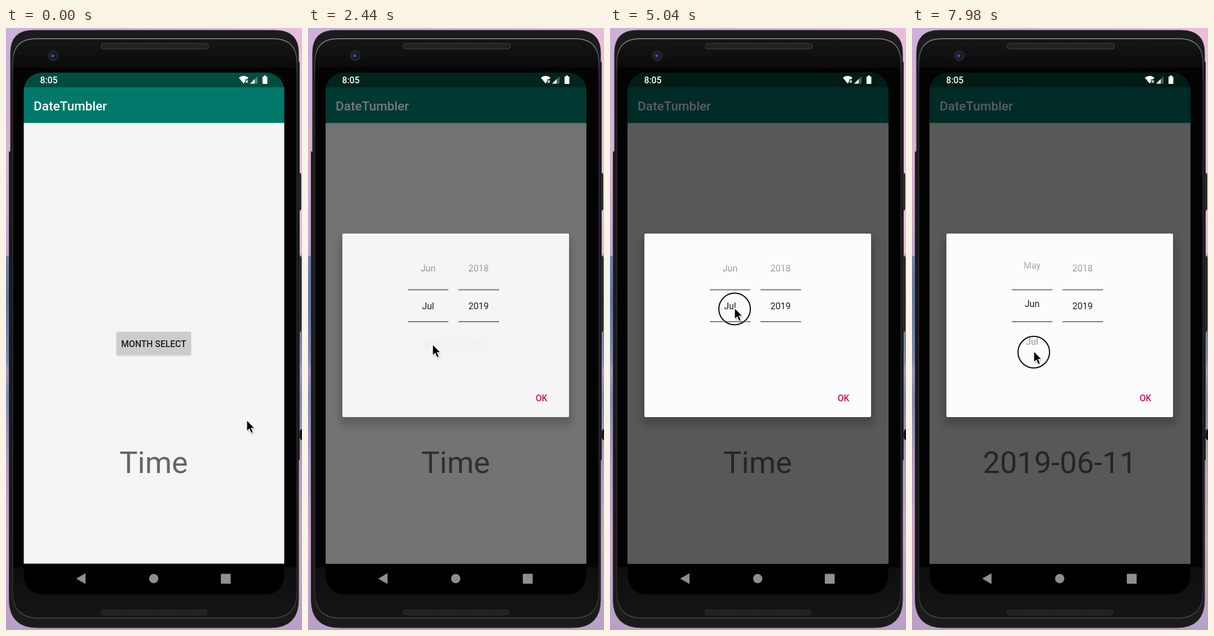
Animation of 525x1066 px, one loop 8000 ms. Source, as an HTML page:

```html
<!DOCTYPE html>
<html lang="en">
<head>
<meta charset="utf-8">
<title>Month dialog</title>
<style>
  html, body { margin: 0; width: 100%; height: 100%; overflow: hidden; background: #c9a4c9; }
  svg { display: block; width: 100%; height: 100%; }
  text { font-family: Roboto, sans-serif; }
  .medium { font-weight: 500; }
  .center { text-anchor: middle; }
  .wheel { font-size: 16px; fill: #1c1c1c; text-anchor: middle; }
</style>
</head>
<body>
<svg viewBox="0 0 525 1066" preserveAspectRatio="none">
  <defs>
    <linearGradient id="sky" x2="0" y2="1">
      <stop offset="0" stop-color="#cbb0d8"/>
      <stop offset=".2" stop-color="#d8b2d2"/>
      <stop offset=".378" stop-color="#c3a4cb"/>
      <stop offset=".38" stop-color="#7381ae"/>
      <stop offset=".45" stop-color="#6478a5"/>
      <stop offset=".55" stop-color="#8288b2"/>
      <stop offset=".57" stop-color="#a797be"/>
      <stop offset=".61" stop-color="#8389b2"/>
      <stop offset=".72" stop-color="#b49bc2"/>
      <stop offset=".85" stop-color="#cba6c9"/>
      <stop offset="1" stop-color="#b9a0c6"/>
    </linearGradient>
    <linearGradient id="glow">
      <stop offset=".3" stop-color="#f3c2dc" stop-opacity="0"/>
      <stop offset="1" stop-color="#f3c2dc" stop-opacity=".75"/>
    </linearGradient>
    <linearGradient id="body" x2="0" y2="1">
      <stop offset="0" stop-color="#161616"/>
      <stop offset=".05" stop-color="#0b0b0b"/>
      <stop offset=".9" stop-color="#0d0d0d"/>
      <stop offset="1" stop-color="#151515"/>
    </linearGradient>
    <linearGradient id="glint" x2="0" y2="1">
      <stop offset="0" stop-color="#8a8a8a"/>
      <stop offset=".03" stop-color="#505050"/>
      <stop offset=".07" stop-color="#2b2b2b"/>
      <stop offset=".95" stop-color="#2b2b2b"/>
      <stop offset="1" stop-color="#484848"/>
    </linearGradient>
    <linearGradient id="barShade" x2="0" y2="1">
      <stop offset="0" stop-opacity=".12"/>
      <stop offset="1" stop-opacity="0"/>
    </linearGradient>
    <linearGradient id="fade" gradientUnits="userSpaceOnUse" x1="0" x2="0" y1="391" y2="594">
      <stop offset="0" stop-color="#fff" stop-opacity="0"/>
      <stop offset=".4" stop-color="#fff"/>
      <stop offset=".6" stop-color="#fff"/>
      <stop offset="1" stop-color="#fff" stop-opacity="0"/>
    </linearGradient>
    <mask id="wheelMask" maskUnits="userSpaceOnUse" x="170" y="391" width="180" height="203">
      <rect x="170" y="391" width="180" height="203" fill="url(#fade)"/>
    </mask>
    <pattern id="mesh" width="3" height="3" patternUnits="userSpaceOnUse">
      <rect width="3" height="3" fill="#1b1b1b"/>
      <path d="M0 0h1.5v1.5H0z" fill="#343434"/>
    </pattern>
    <filter id="soft" x="-20%" y="-20%" width="140%" height="140%"><feGaussianBlur stdDeviation="7"/></filter>
    <filter id="small" x="-20%" y="-40%" width="140%" height="180%"><feGaussianBlur stdDeviation="1.5"/></filter>
    <clipPath id="screen"><path d="M31.500 948.500V111A32 32 0 0 1 63.500 79H461.500A32 32 0 0 1 493.500 111V948.500Z"/></clipPath>
    <clipPath id="btn"><rect x="196" y="538" width="132" height="41" rx="2"/></clipPath>
  </defs>

  <rect width="525" height="1066" fill="url(#sky)"/>
  <rect width="525" height="400" fill="url(#glow)"/>
  <ellipse cx="525" cy="720" rx="5" ry="10" fill="#16131a"/>
  <path d="M518 257h3q2 0 2 3v60q0 3-2 3h-3zM518 404h3q2 0 2 3v128q0 3-2 3h-3z" fill="#242426" stroke="#090909"/>
  <path d="M8 44Q8 4 48 4H477Q519 4 519 44V60H520.500V765H519V1012Q519 1062 469 1062H56Q5.500 1062 5.500 1012V219H8Z" fill="#1b1b1b" stroke="#333335"/>
  <path d="M12 60Q13 19 52 19H474Q515 19 516 60V1000Q516 1045 470 1045H58Q12 1045 12 1000Z" fill="url(#body)" stroke="url(#glint)" stroke-width="1.600"/>
  <rect x="13" y="70" width="502" height="885" fill="#030303"/>
  <rect x="169" y="27.500" width="190" height="9.500" rx="4" fill="url(#mesh)" stroke="#444"/>
  <rect x="168.500" y="1030.500" width="188" height="8.500" rx="4" fill="url(#mesh)" stroke="#303030"/>
  <circle cx="84" cy="49" r="9.500" fill="#262628"/>
  <circle cx="84" cy="49" r="6" fill="#0f1428"/>
  <circle cx="83" cy="49" r="3" fill="#35508a"/>
  <path d="M31.500 948H493.500V971A32 32 0 0 1 461.500 1003H63.500A32 32 0 0 1 31.500 971Z"/>
  <g fill="#8f8f8f">
    <path d="M124.500 975L141 965.500V984.500Z"/>
    <circle cx="262" cy="975" r="8.200"/>
    <rect x="381" y="966.500" width="17.500" height="17.500" rx="1"/>
  </g>

  <g clip-path="url(#screen)">
    <rect x="31" y="168" width="463" height="781" fill="#f5f5f5"/>
    <rect x="31" y="168" width="463" height="3" fill="url(#barShade)"/>
    <rect x="31" y="105" width="463" height="63" fill="#00796b"/>
    <rect x="31" y="79" width="463" height="26" fill="#004d40"/>
    <text class="medium" x="49" y="145.500" font-size="22.500" fill="#fff">DateTumbler</text>
    <rect id="lift" x="195" y="540" width="135" height="44" rx="3" filter="url(#small)"/>
    <rect x="196" y="539" width="132" height="41" rx="2" opacity=".2" filter="url(#small)"/>
    <rect x="196" y="538" width="132" height="41" rx="2" fill="#ccc"/>
    <g id="press" clip-path="url(#btn)">
      <rect x="196" y="538" width="132" height="41" opacity=".04"/>
      <circle id="ripple" cx="221" cy="561" opacity=".1"/>
    </g>
    <text class="medium center" x="262" y="564.500" font-size="15.700" fill="#1f1f1f">MONTH SELECT</text>
    <text id="result" class="center" x="262" y="787.800" font-size="54" fill="#666">Time</text>
    <rect id="dim" x="31" y="79" width="463" height="870"/>

    <g id="dialog">
      <rect x="56" y="372" width="412" height="331" rx="6" opacity=".19" filter="url(#soft)"/>
      <rect x="61" y="364" width="402" height="325" rx="2" fill="#fcfcfc"/>
      <g mask="url(#wheelMask)">
        <g id="months" class="wheel"></g>
        <g id="years" class="wheel"></g>
      </g>
      <path d="M177 463.500h72M267 463.500h72M177 520h72M267 520h72" stroke="#7c7c7c" stroke-width="2.200"/>
      <text class="medium center" x="414" y="660.500" font-size="15.700" fill="#d0125b">OK</text>
    </g>
  </g>

  <g fill="#fff">
    <text class="medium" x="60.500" y="98" font-size="15.700">8:05</text>
    <path d="M413 88Q421.500 81.500 430 88L427.500 91H424V95L421.500 98.500Z"/>
    <path d="M425 92.500l4 4.500m0-4.500l-4 4.500" stroke="#fff" stroke-width="1.300"/>
    <path d="M433 98.500L446 85.500V98.500Z" opacity=".3"/>
    <path d="M433 98.500L441 90.500V98.500Z"/>
    <path d="M455 86h2.500v-2h3.500v2h2.500v13H455z"/>
  </g>

  <g id="pointer">
    <g id="ring" fill="none">
      <circle cy="1" r="28.500" stroke="#fff" stroke-opacity=".6" stroke-width="4"/>
      <circle cy="1" r="28" stroke="#080808" stroke-width="2"/>
    </g>
    <g transform="translate(0 -.5) scale(1.06)">
      <path d="M1 3V20L5 16.500 8 23.500 11.500 22 8.500 15H14Z" opacity=".35" filter="url(#small)"/>
      <path d="M0 -.500V18.500L4.300 14.500 7.400 21.800 10.800 20.300 7.700 13.200H13.300Z" stroke="#fff" stroke-width="1.100"/>
    </g>
  </g>
</svg>
<script>
const LOOP = 8000, ROW = 67.3, GRAB = 496.5, SLOP = 13.5, CHANGE = 51;
const $ = id => document.getElementById(id);
const clamp = v => Math.min(1, Math.max(0, v));
const linear = u => u;
const smooth = u => u * u * (3 - 2 * u);
const out = u => 1 - (1 - u) ** 2;

// Key: [time, ease into this key, ...values]
const pointerKeys = [
  [0, linear, 427, 695], [720, smooth, 221, 561],
  [2960, linear, 221, 561], [3760, smooth, 298, GRAB],
  [4080, linear, 268, GRAB], [4500, out, 246, GRAB],
  [4600, linear, 246, GRAB], [4960, out, 221, GRAB],
  [5740, linear, 221, GRAB], [6420, linear, 221, 520],
  [6560, linear, 221, 522], [7300, linear, 218, 558],
  [7400, linear, 218, 559], [7980, linear, 216, 573]
];
const dimKeys = [[2140, linear, 0], [2280, linear, .237], [2440, linear, .53], [2600, out, .64]];
const dialogKeys = [[2140, linear, 0], [2280, linear, .55], [2440, linear, .95], [2560, linear, 1]];

function sample(keys, t) {
  if (t <= keys[0][0]) return keys[0].slice(2);
  const i = keys.findIndex(k => k[0] > t);
  if (i < 0) return keys[keys.length - 1].slice(2);
  const a = keys[i - 1], b = keys[i];
  const u = b[1]((t - a[0]) / (b[0] - a[0]));
  return a.slice(2).map((v, j) => v + (b[j + 2] - v) * u);
}

function fillWheel(id, x, labels) {
  $(id).innerHTML = labels.map((label, i) =>
    `<text x="${x}" y="${498 - i * ROW}">${label}</text>`).join('');
}
fillWheel('months', 213, ['Jul', 'Jun', 'May', 'Apr']);
fillWheel('years', 302.5, ['2019', '2018']);

function render(t) {
  const [x, y] = sample(pointerKeys, t);
  $('pointer').setAttribute('transform', `translate(${x} ${y})`);
  const held = (t >= 1000 && t < 1700) || t >= 5020;
  $('ring').setAttribute('opacity', !held ? 0 : t < 1020 ? .5 : 1);

  const pressed = clamp((t - 1300) / 80) * (1 - clamp((t - 1740) / 240));
  $('press').setAttribute('opacity', pressed);
  $('lift').setAttribute('opacity', .12 * pressed);
  $('ripple').setAttribute('r', 12 + 110 * out(clamp((t - 1300) / 300)));

  $('dim').setAttribute('opacity', sample(dimKeys, t)[0]);
  $('dialog').setAttribute('opacity', sample(dialogKeys, t)[0]);

  const scroll = t < 5740 ? 0 : Math.max(0, y - GRAB - SLOP);
  $('months').setAttribute('transform', `translate(0 ${scroll})`);
  $('result').textContent = scroll > CHANGE ? '2019-06-11' : 'Time';
}

const start = performance.now();
function tick() {
  render((performance.now() - start) % LOOP);
  requestAnimationFrame(tick);
}
tick();
</script>
</body>
</html>
```
